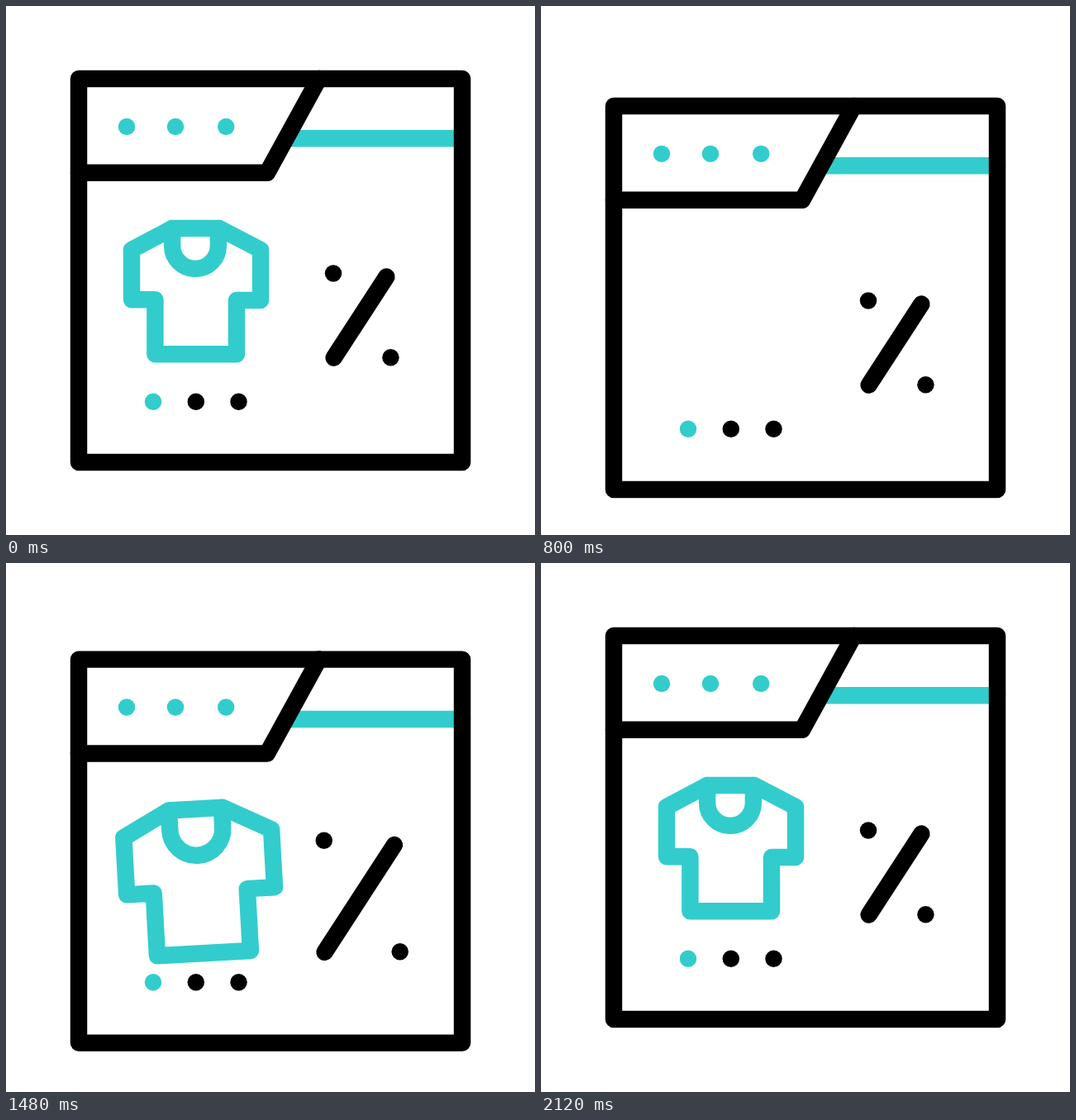
An HTML page with a canvas for the animation above (2280 ms loop, 640 by 640 pixels).

```html
<!DOCTYPE html>
<html lang="en">
<head>
<meta charset="utf-8">
<title>Shop window</title>
<style>
html, body { margin: 0; width: 100%; height: 100%; overflow: hidden; background: #fff; }
canvas { display: block; width: 640px; height: 640px; }
</style>
</head>
<body>
<canvas id="stage" width="640" height="640"></canvas>
<script>
const ctx = document.getElementById('stage').getContext('2d');
const LOOP = 2280, STEP = 40;
const TEAL = '#33cccc', BLACK = '#000';
const LINE = 20.48, DOT = 10.24;

// Eased 0..1 along the curve (a, 0, b, 1)
function ease(u, a = 0.53, b = 0.45) {
  let lo = 0, hi = 1, s = 0.5;
  for (let i = 0; i < 24; i++) {
    const r = 1 - s;
    const x = 3 * a * s * r * r + 3 * b * s * s * r + s * s * s;
    if (x < u) lo = s; else hi = s;
    s = (lo + hi) / 2;
  }
  return s * s * (3 - 2 * s);
}

// Keys: [time, value, a, b]; a and b shape the move to the next key
function track(keys, t) {
  if (t <= keys[0][0]) return keys[0][1];
  for (let i = 1; i < keys.length; i++) {
    const [t0, v0, a, b] = keys[i - 1], [t1, v1] = keys[i];
    if (t < t1) return v0 + (v1 - v0) * ease((t - t0) / (t1 - t0), a, b);
  }
  return keys[keys.length - 1][1];
}

const DROP = [[40, 0, 0.535, 0.46], [1120, 38.4, 0.5225, 0.42], [2120, 0]];
const POP = 960;
const EXIT_X = [[64, 0, 0.55, 0.45], [905, -256]];
const EXIT_TILT = [[40, 0], [500, -9]];
const ENTER_SIZE = [[POP, 0], [1300, 1.177], [1880, 1]];
const ENTER_TILT = [[POP, 11], [1300, -4.2], [1800, 0]];
const PERCENT_SIZE = [[1100, 1], [1640, 1.376], [2120, 1]];

function stroke(color) {
  ctx.strokeStyle = color;
  ctx.lineWidth = LINE;
  ctx.lineCap = ctx.lineJoin = 'round';
  ctx.stroke();
}

function poly(points, color, closed) {
  ctx.beginPath();
  points.forEach(p => ctx.lineTo(p[0], p[1]));
  if (closed) ctx.closePath();
  stroke(color);
}

function dot(x, y, color) {
  ctx.beginPath();
  ctx.arc(x, y, DOT, 0, Math.PI * 2);
  ctx.fillStyle = color;
  ctx.fill();
}

// Points relative to the middle of the neckline
const BODY = [
  [-28.7, 0], [28.3, 0], [78.3, 26], [78.3, 87], [49.3, 87], [49.3, 152.3],
  [-49.3, 152.3], [-49.3, 86.2], [-77.7, 86.2], [-77.7, 26]
];

function shirt(t) {
  const leaving = t < POP;
  const size = leaving ? 1 : track(ENTER_SIZE, t);
  if (size <= 0) return;
  const x = 229.7 + (leaving ? track(EXIT_X, t) : 0);
  const tilt = track(leaving ? EXIT_TILT : ENTER_TILT, t) * Math.PI / 180;

  ctx.save();
  ctx.beginPath();
  ctx.rect(88, 88, 464, 464);
  ctx.clip();
  ctx.translate(x, 269);
  ctx.rotate(tilt);
  poly(BODY.map(p => [p[0] * size, p[1] * size]), TEAL, true);
  // Collar
  const r = 27.9 * size, y = 21 * size, mid = -0.7 * size;
  ctx.beginPath();
  ctx.moveTo(mid - r, 0);
  ctx.lineTo(mid - r, y);
  ctx.arc(mid, y, r, Math.PI, 0, true);
  ctx.lineTo(mid + r, 0);
  stroke(TEAL);
  ctx.restore();
}

function percent(t) {
  const k = track(PERCENT_SIZE, t);
  const at = (x, y) => [430.7 + x * k, 374.4 + y * k];
  poly([at(29.6, -46.8), at(-34.1, 51.2)], BLACK);
  dot(...at(-34.7, -50.8), BLACK);
  dot(...at(34.7, 50.8), BLACK);
}

function draw(t) {
  ctx.fillStyle = '#fff';
  ctx.fillRect(0, 0, 640, 640);
  ctx.save();
  ctx.translate(0, track(DROP, t));
  shirt(t);
  poly([[339, 160.3], [552, 160.3]], TEAL);
  poly([[88, 201.8], [316, 201.8], [378.5, 88]], BLACK);
  poly([[88, 88], [552, 88], [552, 552], [88, 552]], BLACK, true);
  [146, 205, 266.2].forEach(x => dot(x, 145.9, TEAL));
  [178, 229.8, 281.5].forEach((x, i) => dot(x, 478.7, i ? BLACK : TEAL));
  percent(t);
  ctx.restore();
}

const start = performance.now();
function tick() {
  const t = (performance.now() - start) % LOOP;
  draw(Math.floor(t / STEP) * STEP);
  requestAnimationFrame(tick);
}
tick();
</script>
</body>
</html>
```
